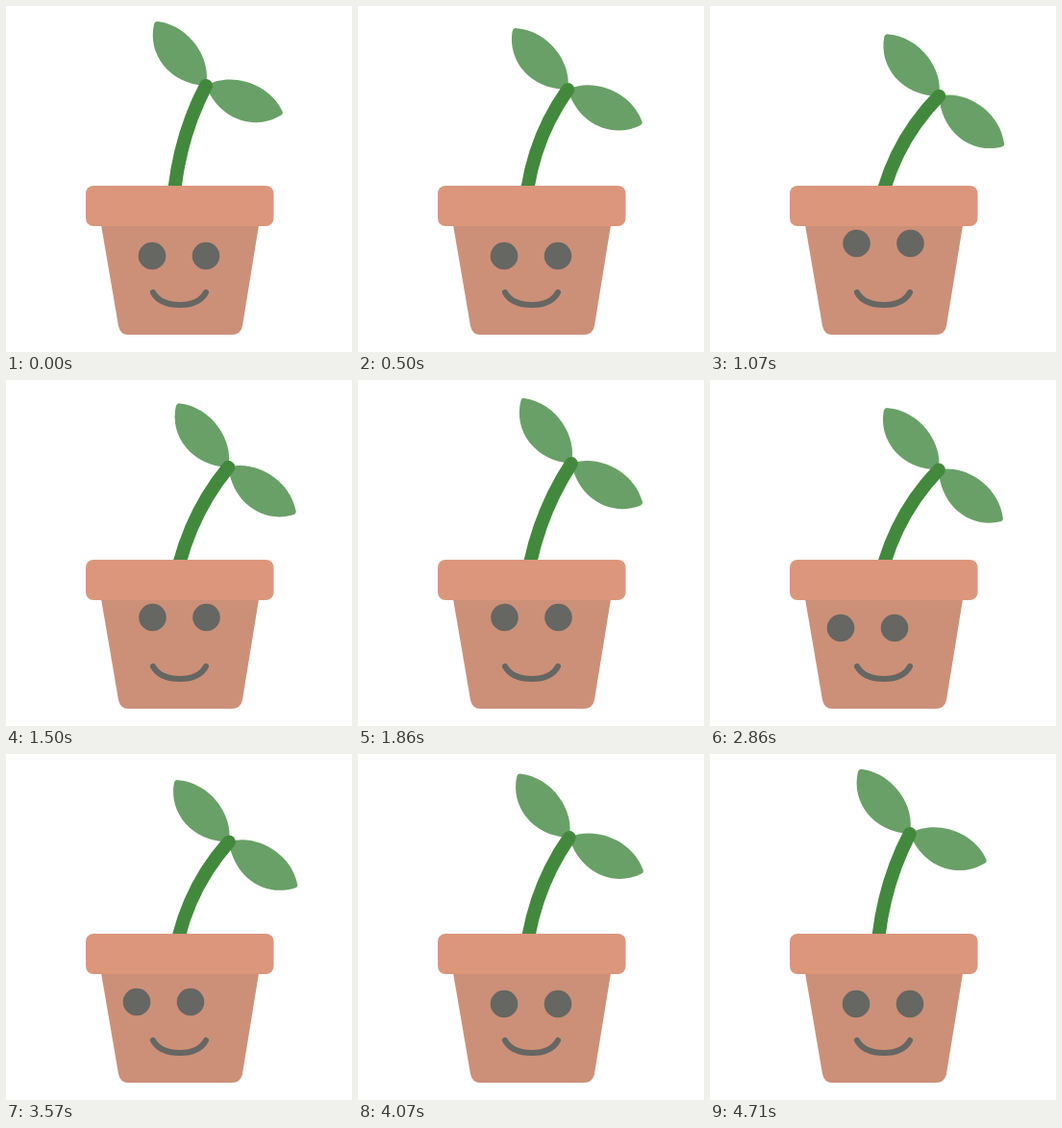
Write an HTML page that moves like this. It is 360 by 360 pixels and loops after 4780 ms.

```html
<!DOCTYPE html>
<html lang="en">
<head>
<meta charset="utf-8">
<title>Swaying seedling</title>
<style>
  html, body { margin: 0; width: 100%; height: 100%; overflow: hidden; background: #fff; }
  svg { display: block; width: 100%; height: 100%; }
</style>
</head>
<body>
<svg viewBox="0 0 360 360">
  <defs>
    <path id="leaf" d="M0 0C18-22 60-25 83-2Q86 0 84 3C64 28 25 29 0 0Z"/>
  </defs>
  <g fill="#69a067">
    <use id="left" href="#leaf"/>
    <use id="right" href="#leaf"/>
  </g>
  <path id="stem" fill="none" stroke="#43893d" stroke-width="14" stroke-linecap="round"/>
  <path fill="#cc9078" d="M98 222H264L246 333Q244 342 235 342H127Q119 342 117 333Z"/>
  <rect x="83" y="187" width="195.500" height="42" rx="8" fill="#db967b"/>
  <g id="eyes" fill="#666662">
    <circle cx="152" cy="260" r="14.300"/>
    <circle cx="208" cy="260" r="14.300"/>
  </g>
  <path d="M153 298Q160 311 181 311Q201 311 208 298" fill="none" stroke="#666662" stroke-width="6" stroke-linecap="round"/>
</svg>
<script>
const LOOP = 4780;
const BASE = { x: 173, y: 228 };

// time, stem rotation (deg), tip bend (px), leaf spread (deg)
const SWAY = [
  [0, 0, 0, 0], [300, 0.3, 4, 1.5], [600, 1.2, 10.5, 5.3], [1070, 7.35, 12, 10.2],
  [1300, 7.7, 10, 9.5], [1640, 6.4, 3, 6], [1860, 5.5, 0.2, 4.2], [2050, 5.3, 0, 3.9],
  [2360, 6, 3, 6], [2860, 7.8, 10.5, 10.7], [3200, 7, 12, 9.8], [3570, 5.2, 11, 8.1],
  [4070, 2.3, 6, 2.8], [4400, 0.7, 2, 1], [4640, 0, 0, 0], [LOOP, 0, 0, 0]
];

// start, duration, dx, dy of each glance
const GLANCES = [[750, 300, 0.5, -13], [2200, 300, -16.5, 11], [3650, 300, 16, 2]];

const $ = id => document.getElementById(id);
const set = (id, name, value) => $(id).setAttribute(name, value);

function slope(i, c) {
  const a = SWAY[i - 1], b = SWAY[i + 1];
  return a && b ? (b[c] - a[c]) / (b[0] - a[0]) : 0;
}

// Cubic Hermite interpolation through the sway poses
function sway(t, c) {
  const i = SWAY.findIndex((key, n) => n && t <= key[0]) - 1;
  const a = SWAY[i], b = SWAY[i + 1], span = b[0] - a[0];
  const u = (t - a[0]) / span, v = 1 - u;
  return v * v * (1 + 2 * u) * a[c] + u * u * (1 + 2 * v) * b[c]
    + u * v * span * (v * slope(i, c) - u * slope(i + 1, c));
}

function rotate(x, y, deg) {
  const r = deg * Math.PI / 180, cos = Math.cos(r), sin = Math.sin(r);
  return { x: BASE.x + x * cos - y * sin, y: BASE.y + x * sin + y * cos };
}

function draw(t) {
  const [turn, bend, spread] = [1, 2, 3].map(c => sway(t, c));
  const mid = rotate(1, -80, turn), tip = rotate(35, -145, turn);
  tip.x += bend;
  tip.y += bend * 0.42;

  const at = `translate(${tip.x} ${tip.y})`;
  set("stem", "d", `M${BASE.x} ${BASE.y}Q${mid.x} ${mid.y} ${tip.x} ${tip.y}`);
  set("right", "transform", `${at} rotate(${19.3 + turn + spread})`);
  set("left", "transform", `${at} scale(-1 1) rotate(${-52.2 - turn + spread})`);

  let x = 0, y = 0;
  for (const [start, duration, dx, dy] of GLANCES) {
    const u = Math.min(1, Math.max(0, (t - start) / duration));
    const eased = u * u * (3 - 2 * u);
    x += dx * eased;
    y += dy * eased;
  }
  set("eyes", "transform", `translate(${x} ${y})`);
}

const begin = performance.now();
function tick() {
  draw((performance.now() - begin) % LOOP);
  requestAnimationFrame(tick);
}
tick();
</script>
</body>
</html>
```
